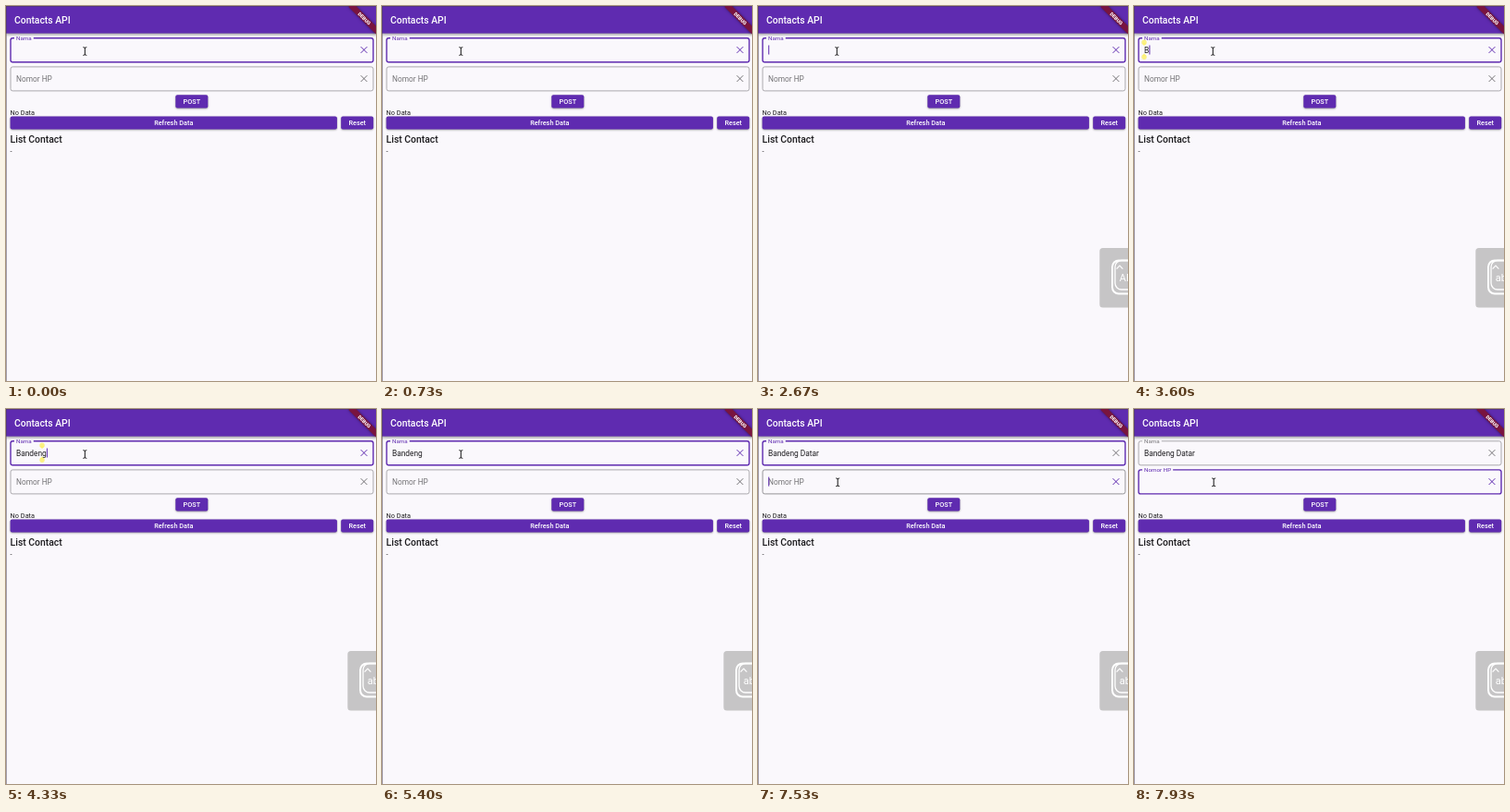
Animation, 400 px wide and 406 px high, one loop 8 s. Source, as an HTML page with a canvas:

```html
<!DOCTYPE html>
<html lang="id">
<head>
<meta charset="utf-8">
<title>Contacts API</title>
<style>
html, body { margin: 0; width: 100%; height: 100%; overflow: hidden; background: #faf8fc; }
canvas { display: block; width: 400px; height: 406px; }
</style>
</head>
<body>
<canvas id="stage"></canvas>
<script>
const W = 400, H = 406, LOOP = 8000;
const PURPLE = '#5f2bb0', BG = '#faf8fc', INK = '#1c1b1e', GREY = '#757477', LINE = '#a3a1a5';
const FONT = 'Roboto, "Noto Sans", sans-serif';
const NAME = 'Bandeng Datar';
const KEYS = [3420, 3680, 3780, 3890, 4000, 4130, 4270, 4530, 5470, 5800, 6070, 6215, 6400];
const CAPS_ON = 1180, CAPS_OFF = 3580;
const FOCUS = 7490, SHIFT = 7540, SHIFT_TIME = 180;

const canvas = document.getElementById('stage');
const ctx = canvas.getContext('2d');
const dpr = window.devicePixelRatio || 1;
canvas.width = W * dpr;
canvas.height = H * dpr;

const clamp = x => Math.min(1, Math.max(0, x));
const ease = x => x * x * (3 - 2 * x);
const lerp = (a, b, p) => a + (b - a) * p;
const rgb = hex => [1, 3, 5].map(i => parseInt(hex.slice(i, i + 2), 16));

function mix(a, b, p) {
  const to = rgb(b);
  return `rgb(${rgb(a).map((v, i) => Math.round(lerp(v, to[i], p)))})`;
}

function text(str, x, y, size, color = INK, weight = 400, align = 'left') {
  ctx.font = `${weight} ${size}px ${FONT}`;
  ctx.textAlign = align;
  ctx.fillStyle = color;
  ctx.fillText(str, x, y);
}

function widthOf(str, size) {
  ctx.font = `400 ${size}px ${FONT}`;
  return ctx.measureText(str).width;
}

function box(x, y, w, h, r) {
  ctx.beginPath();
  ctx.roundRect(x, y, w, h, r);
}

function strokePath(points, color, width) {
  ctx.beginPath();
  points.forEach(([x, y], i) => i ? ctx.lineTo(x, y) : ctx.moveTo(x, y));
  ctx.strokeStyle = color;
  ctx.lineWidth = width;
  ctx.stroke();
}

function shadow(blur, dy, color) {
  ctx.shadowColor = color;
  ctx.shadowBlur = blur * dpr;
  ctx.shadowOffsetY = dy * dpr;
}

function button(label, x, y, w, h) {
  ctx.save();
  shadow(2, 0.8, 'rgba(0,0,0,.4)');
  ctx.fillStyle = PURPLE;
  box(x, y, w, h, 2);
  ctx.fill();
  ctx.restore();
  text(label, x + w / 2, y + h / 2 + 2.6, 7.3, '#fff', 500, 'center');
}

// focus: 0..1 outline highlight, lift: 0..1 label position
function field(label, y, focus, lift, clearColor, idle = LINE) {
  ctx.strokeStyle = mix(idle, PURPLE, focus);
  ctx.lineWidth = lerp(0.9, 1.4, focus);
  box(5, y, 392, 26, 2.2);
  ctx.stroke();

  const size = lerp(8.33, 6.25, lift);
  if (lift > 0) {
    const gap = (widthOf(label, 6.25) + 4) * lift;
    ctx.fillStyle = BG;
    ctx.fillRect(9, y - 1.5, gap, 3);
  }
  text(label, 11, lerp(y + 15.8, y + 2.1, lift), size, mix(GREY, PURPLE, focus));

  const cx = 387, cy = y + 12.7, r = 3.4;
  strokePath([[cx - r, cy - r], [cx + r, cy + r]], clearColor, 1);
  strokePath([[cx + r, cy - r], [cx - r, cy + r]], clearColor, 1);
}

function caret(x, y) {
  ctx.fillStyle = PURPLE;
  ctx.fillRect(x, y - 5, 1, 10);
}

function caretMark(x) {
  ctx.save();
  ctx.fillStyle = 'rgba(250,240,110,.85)';
  for (const side of [-1, 1]) {
    const y = 47.3 + side * 8;
    ctx.beginPath();
    ctx.arc(x, y, 2.7, 0, 7);
    ctx.fill();
    ctx.beginPath();
    ctx.moveTo(x - 2.5, y - side);
    ctx.lineTo(x + 2.5, y - side);
    ctx.lineTo(x, y - side * 4);
    ctx.fill();
  }
  ctx.restore();
}

function pointer(x, y) {
  strokePath([[x, y - 4], [x, y + 4]], '#111', 1);
  for (const s of [-1, 1])
    strokePath([[x - 2, y + s * 4.4], [x, y + s * 3.8], [x + 2, y + s * 4.4]], '#111', 0.9);
}

function debugBanner() {
  ctx.save();
  ctx.translate(W, 1);
  ctx.rotate(Math.PI / 4);
  ctx.save();
  shadow(3, 0, 'rgba(0,0,0,.5)');
  ctx.fillStyle = '#79143f';
  ctx.fillRect(-21, 14.6, 42, 6.3);
  ctx.restore();
  text('DEBUG', 0, 19.7, 5.3, '#fff', 900, 'center');
  ctx.restore();
}

function capsPanel(letters) {
  ctx.fillStyle = '#c6c5c6';
  box(369.3, 262, 50, 64.6, 3.5);
  ctx.fill();
  ctx.strokeStyle = '#fff';
  ctx.lineWidth = 2;
  box(383, 275.5, 44, 36, 7);
  ctx.stroke();
  ctx.lineWidth = 1.3;
  box(386, 275.5, 40, 31.5, 7);
  ctx.stroke();
  strokePath([[387.6, 284.6], [391, 281], [394.4, 284.6]], '#fff', 1.2);
  text(letters, 390.8, 297.5, 11, '#fff');
}

function nameField(t) {
  const typed = KEYS.filter(k => k <= t).length;
  const value = NAME.slice(0, typed);
  const caretAt = n => 11 + widthOf(NAME.slice(0, n), 8.33);
  const since = typed ? t - KEYS[typed - 1] : t + 800;
  if (typed && since < 190) caretMark(caretAt(typed - 1));
  text(value, 11, 51, 8.33);
  if (t < FOCUS && since % 1000 < 500) caret(caretAt(typed) + 0.2, 47.5);
}

function draw(t) {
  ctx.setTransform(dpr, 0, 0, dpr, 0, 0);
  ctx.fillStyle = BG;
  ctx.fillRect(0, 0, W, H);

  ctx.save();
  shadow(3, 1, 'rgba(0,0,0,.4)');
  ctx.fillStyle = PURPLE;
  ctx.fillRect(0, 0, W, 29.6);
  ctx.restore();
  ctx.fillStyle = 'rgba(70,60,85,.6)';
  ctx.fillRect(0, 0, W, 0.8);
  ctx.fillRect(0, 0, 0.8, H);
  text('Contacts API', 9, 19.3, 10.35, '#fff', 500);
  debugBanner();

  const moved = ease(clamp((t - 7100) / 220));
  const shift = ease(clamp((t - SHIFT) / SHIFT_TIME));
  const second = t >= FOCUS;
  field('Nama', 34.8, 1 - shift, 1, second ? GREY : PURPLE);
  field('Nomor HP', 65.9, shift, shift, second ? PURPLE : GREY, moved > 0.6 ? '#8b898d' : LINE);
  nameField(t);
  if (second && t < 7800) caret(11.2, 78.6);

  button('POST', 183.3, 96.3, 35, 14.2);
  text('No Data', 4.6, 117.6, 7.33);
  button('Refresh Data', 4.6, 119.4, 353.3, 14);
  button('Reset', 362.2, 119.4, 35, 14);
  text('List Contact', 4.6, 147.8, 10.4, INK, 500);
  text('-', 4.6, 160.4, 7.33);

  if (t >= CAPS_ON) capsPanel(t < CAPS_OFF ? 'AB' : 'ab');
  pointer(lerp(85.3, 86.2, moved), lerp(49, 79.3, moved));
}

const start = performance.now();
function tick() {
  draw((performance.now() - start) % LOOP);
  requestAnimationFrame(tick);
}
tick();
</script>
</body>
</html>
```
